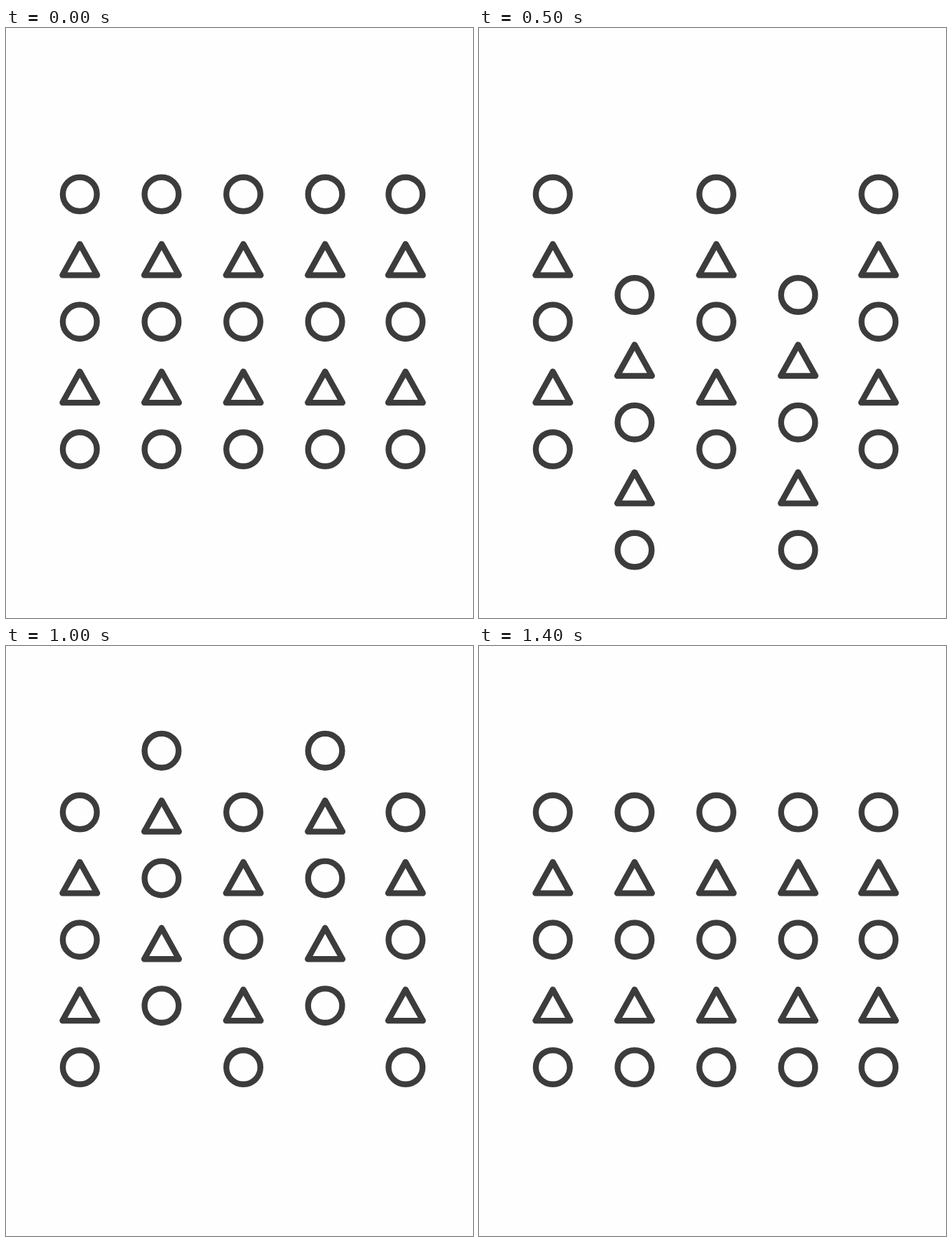
Animation, 666 px wide and 841 px high, one loop 1500 ms. Source, as an HTML page:

```html
<!DOCTYPE html>
<html lang="en">
<head>
<meta charset="utf-8">
<title>Sliding columns</title>
<style>
  html, body { margin: 0; height: 100%; overflow: hidden; background: #fefefe; }
  svg { display: block; width: 666px; height: 841px; }
  .mark { fill: none; stroke: #3c3c3c; stroke-width: 8.4; stroke-linejoin: round; }
</style>
</head>
<body>
<svg viewBox="0 0 666 841">
  <defs>
    <circle id="ring" class="mark" r="24.3"/>
    <path id="triangle" class="mark" d="M0 -19.6L24.8 24.9H-24.8Z"/>
    <g id="column">
      <use href="#ring" y="237"/>
      <use href="#triangle" y="327.5"/>
      <use href="#ring" y="418.7"/>
      <use href="#triangle" y="509.2"/>
      <use href="#ring" y="600.5"/>
    </g>
  </defs>
  <use href="#column" x="105.3"/>
  <use href="#column" x="338.5"/>
  <use href="#column" x="569.8"/>
  <g id="sliders">
    <use href="#column" x="221.9"/>
    <use href="#column" x="455.1"/>
  </g>
</svg>
<script>
  const LOOP = 1500, STEP = 100;
  const sliders = document.getElementById('sliders');

  // [time in ms, vertical offset in px]
  const path = [
    [0, 0], [200, 60], [500, 143.5], [600, 120], [800, 12.7],
    [1000, -87.8], [1100, -132.8], [1200, -86.8], [1400, 0], [LOOP, 0]
  ];

  function offsetAt(time) {
    const next = path.findIndex(([t]) => t > time);
    const [t0, y0] = path[next - 1], [t1, y1] = path[next];
    return y0 + (y1 - y0) * (time - t0) / (t1 - t0);
  }

  function draw() {
    const time = performance.now() % LOOP;
    const held = Math.floor(time / STEP) * STEP;
    sliders.setAttribute('transform', `translate(0 ${offsetAt(held)})`);
    requestAnimationFrame(draw);
  }
  draw();
</script>
</body>
</html>
```
